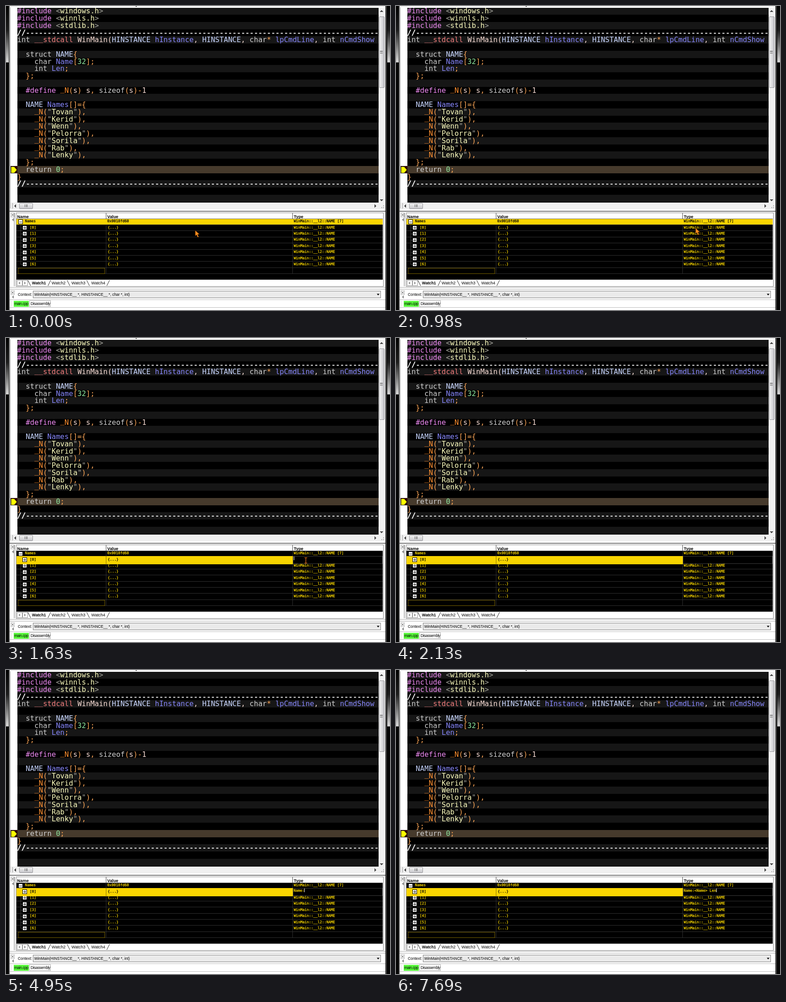
Animation, 842 px wide and 665 px high, one loop 8 s. Source, as an HTML page:

```html
<!DOCTYPE html>
<html lang="en">
<head>
<meta charset="utf-8">
<title>Debugger watch</title>
<style>
  html, body { margin: 0; width: 100%; height: 100%; overflow: hidden; background: #000; }
  svg { display: block; width: 842px; height: 665px; }
  text { white-space: pre; }
  .code { font: 15.68px "DejaVu Sans Mono", monospace; fill: #d4d4d4; }
  .cell { font: 7.92px "DejaVu Sans Mono", monospace; color: #ffdc00; }
  .cell, .cell text { fill: currentColor; stroke: currentColor; stroke-width: .25px; }
  .ui { font: 8.5px "Liberation Sans", Arial, sans-serif; fill: #000; }
  .ui.b { font-weight: bold; font-size: 9.3px; }
  .tab { font-size: 9.1px; }
  .tight { font-size: 8.4px; letter-spacing: -.42px; }
  .pp { fill: #f08cf4; }
  .st { fill: #ffffc0; }
  .q { fill: #a4a49c; }
  .kw { fill: #d0d0d0; }
  .cc { fill: #f07c7c; }
  .fn { fill: #f8dcd4; }
  .ty { fill: #c8d6ff; }
  .id { fill: #8686fa; }
  .op { fill: #ffa858; }
  .mc { fill: #ff9030; }
  .nu { fill: #90e8a0; }
  .cm { fill: #fff; stroke: #fff; stroke-width: .5px; }
  .px { shape-rendering: crispEdges; }
  .sel { color: #000; }
</style>
</head>
<body>
<svg viewBox="0 0 842 665">
  <defs>
    <linearGradient id="edge" x2="0" y2="1">
      <stop offset="0" stop-color="#000"/><stop offset=".08" stop-color="#1c1c1c"/>
      <stop offset=".184" stop-color="#d8d8d8"/><stop offset=".187" stop-color="#050505"/>
      <stop offset="1" stop-color="#050505"/>
    </linearGradient>
    <linearGradient id="thumbV"><stop offset="0" stop-color="#f6f6f6"/><stop offset="1" stop-color="#c4c4c8"/></linearGradient>
    <linearGradient id="thumbH" x2="0" y2="1"><stop offset="0" stop-color="#f6f6f6"/><stop offset="1" stop-color="#c4c4c8"/></linearGradient>
    <clipPath id="pane"><rect x="25" y="4" width="792" height="426"/></clipPath>
  </defs>

  <!-- window frame -->
  <g class="px">
    <rect width="842" height="665" fill="#000"/>
    <rect width="6" height="665" fill="url(#edge)"/>
    <rect x="836" width="6" height="665" fill="url(#edge)"/>
    <rect x="6" width="2" height="665" fill="#4c4c4c"/>
    <rect x="833" width="2" height="665" fill="#4c4c4c"/>
    <rect x="8" width="824" height="665" fill="#fff"/>
    <rect x="8" width="824" height="2" fill="#f0f0f0"/>
    <path d="M283 0h5l-2.500 2z" fill="#444"/>
    <rect x="9" y="3" width="1" height="440" fill="#999"/>
    <rect x="25" y="4" width="792" height="426" fill="#000"/>
  </g>
  <g id="stripes" class="px" clip-path="url(#pane)"></g>
  <rect x="25" y="350" width="792" height="16" fill="#463a2c" class="px"/>
  <rect x="10" y="350" width="15" height="16" fill="#300808" class="px"/>
  <path d="M11 351.500h7l6 7-6 7h-7z" fill="#ff0" stroke="#000" stroke-width=".8"/>
  <g id="code" class="code" clip-path="url(#pane)"></g>

  <!-- scroll bars -->
  <g class="px">
    <rect x="817" y="4" width="14" height="426" fill="#f0f0f0"/>
    <rect x="818.500" y="23.500" width="11" height="155" rx="2" fill="url(#thumbV)" stroke="#959599"/>
    <path d="M820 98h6M820 100.500h6M820 103h6" stroke="#666"/>
    <path d="M820 13h7l-3.500-4zM820 423h7l-3.500 4z" fill="#444"/>
    <rect x="10" y="430" width="821" height="15" fill="#f0f0f0"/>
    <rect x="29.500" y="431.500" width="29" height="12" rx="2" fill="url(#thumbH)" stroke="#959599"/>
    <path d="M41.500 434v6M44 434v6M46.500 434v6" stroke="#666"/>
    <path d="M22 434v7l-4-3.500zM808 434v7l4-3.500z" fill="#444"/>
    <path d="M14.500 431v12" stroke="#999"/>
    <path d="M827 436h2v2h-2zM827 440h2v2h-2zM823 440h2v2h-2z" fill="#aaa"/>
    <rect x="8" y="445" width="824" height="3" fill="#fff"/>
    <rect x="8" y="448" width="824" height="2" fill="#777"/>
  </g>

  <!-- watch panel -->
  <g class="px">
    <rect x="22" y="452" width="805" height="161" fill="#fff" stroke="#888"/>
    <rect x="23" y="466" width="803" height="133" fill="#000"/>
    <path d="M22 465.500h804" stroke="#777"/>
    <path d="M219.500 453v13M628.500 453v13" stroke="#444"/>
    <path d="M17.500 453v160M19.500 453v160M8 615.500h824M8 619.500h824" stroke="#aaa"/>
  </g>
  <path d="M12 454.500l5 5m0-5l-5 5M12 624.500l5 5m0-5l-5 5" stroke="#444"/>
  <rect x="10.500" y="452.500" width="8" height="9" fill="none" stroke="#bbb"/>
  <rect x="10.500" y="622.500" width="8" height="9" fill="none" stroke="#bbb"/>
  <path d="M17 464v7l-4-3.500zM17 633v7l-4-3.500z" fill="#888"/>
  <g class="ui b">
    <text x="24.500" y="463.500">Name</text><text x="222" y="463.500">Value</text><text x="631" y="463.500">Type</text>
  </g>
  <g id="grid" class="px" stroke="#303030"></g>
  <rect id="hl" class="px" x="23" width="803" fill="#f8d400"/>
  <g id="tree" class="px"></g>
  <g id="cells" class="cell"></g>
  <rect class="px" x="26.500" y="573.500" width="190" height="12" fill="none" stroke="#7a6400"/>

  <g id="edit">
    <rect class="px" x="23" y="477" width="606" height="18" fill="#f8d400"/>
    <rect class="px" x="629.500" y="477.500" width="196" height="16" fill="#000" stroke="#3c3c3c"/>
    <path class="px" d="M219.500 477v18" stroke="#8a7400"/>
    <g id="editBox" class="px"></g>
    <g id="editRow" class="cell"></g>
    <text id="typed" class="cell" x="630.500" y="485.300"></text>
    <rect id="caret" class="px" y="478" width="1" height="8" fill="#fff"/>
  </g>

  <!-- tabs -->
  <path class="px" d="M23 598.500h803" stroke="#555"/>
  <g fill="none" stroke="#999" class="px"><rect x="24.500" y="600.500" width="11" height="11"/><rect x="36.500" y="600.500" width="11" height="11"/></g>
  <path d="M31 603v6l-3.500-3zM40 603v6l3.500-3z" fill="#888"/>
  <path d="M48 600l6 12M92 612l6-12M134 600l6 12M177 600l6 12M221 612l6-12" fill="none" stroke="#222"/>
  <g class="ui">
    <text x="57" y="609" font-weight="bold" style="font-size:8.7px">Watch1</text>
    <text class="tab" x="100" y="609">Watch2</text>
    <text class="tab" x="143.500" y="609">Watch3</text>
    <text class="tab" x="187" y="609">Watch4</text>
    <text x="26" y="634" style="font-size:8.350px">Context:</text>
  </g>

  <!-- context bar and file tabs -->
  <rect class="px" x="59.500" y="623.500" width="762" height="15" fill="#eaeaea" stroke="#808080"/>
  <path d="M813 629.500h6l-3 3.500z"/>
  <text class="ui" x="62" y="634" style="font-size:8.440px">WinMain(HINSTANCE__ *, HINSTANCE__ *, char *, int)</text>
  <g class="px">
    <path d="M8 642.500h824M8 659.500h824" stroke="#bbb"/>
    <path d="M11.500 646v11" stroke="#aaa" stroke-dasharray="1 2"/>
    <rect x="17" y="645" width="33" height="13" fill="#58f83c"/>
    <rect x="51.500" y="644.500" width="46" height="13" fill="#fff" stroke="#aaa"/>
  </g>
  <text class="ui tight" x="18" y="654">main.cpp</text>
  <text class="ui tight" x="54" y="654">Disassembly</text>

  <!-- pointers -->
  <path id="arrow" d="M0 0v12l2.800-2.400 2.500 5.400 2.300-1-2.500-5.200 3.900-.5z" fill="#ff9020" stroke="#5a2800" stroke-width=".7"/>
  <g id="noDrop" fill="none" transform="translate(658 486)">
    <circle r="6" stroke="#fff" stroke-width="4"/><path d="M-4-4l8 8" stroke="#fff" stroke-width="3.500"/>
    <circle r="6" stroke="#000" stroke-width="2"/><path d="M-4-4l8 8" stroke="#000" stroke-width="2"/>
  </g>
  <path id="beam" d="M654.500 480.500h2l1 1 1-1h2M657.500 481v11M654.500 492.500h2l1-1 1 1h2" fill="none" stroke="#f07820" stroke-width="1.200"/>
</svg>
<script>
const $ = id => document.getElementById(id);
const esc = s => s.replace(/&/g, "&amp;").replace(/</g, "&lt;");
const show = (id, on) => $(id).style.display = on ? "" : "none";

// Each line is a run of "class~text" pieces divided by "|".
const include = f => `pp~#include |q~<|st~${f}|q~>`;
const rule = "cm~//" + "-".repeat(82);
const entry = s => `mc~    _N|op~(|q~"|st~${s}|q~"|op~),`;
const lines = [
  include("windows.h"), include("winnls.h"), include("stdlib.h"), rule,
  "kw~int |cc~__stdcall |fn~WinMain(|ty~HINSTANCE |id~hInstance|fn~, |ty~HINSTANCE|fn~, |kw~char|op~* |id~lpCmdLine|fn~, |kw~int |id~nCmdShow",
  "", "kw~  struct |ty~NAME|op~{", "kw~    char |id~Name|op~[|nu~32|op~];", "kw~    int |id~Len|op~;", "op~  };",
  "", "pp~  #define |mc~_N|op~(|fn~s|op~) |fn~s|op~, |kw~sizeof|op~(|fn~s|op~)-|fn~1",
  "", "ty~  NAME |id~Names|op~[]={",
  ...["Tovan", "Kerid", "Wenn", "Pelorra", "Sorila", "Rab", "Lenky"].map(entry),
  "op~  };", "kw~  return |nu~0|op~;", "op~}", rule
];
const pitch = 15.75;
// Underscores sit just under the baseline
const raise = s => s.replace(/(_+)(\w)/, '<tspan dy="-2.5" stroke-width=".5">$1</tspan><tspan dy="2.5">$2</tspan>');
$("code").innerHTML = lines.map((l, i) =>
  `<text x="24.5" y="${16.4 + i * pitch}">` + l.split("|").map(p => {
    const [c, s] = p.split("~");
    return s ? `<tspan class="${c}">${raise(esc(s))}</tspan>` : "";
  }).join("") + "</text>").join("");

let html = "";
for (let i = 0; i < 27; i += 2)
  html += `<rect x="25" y="${Math.round(3 + i * pitch)}" width="792" height="16" fill="#161616"/>`;
$("stripes").innerHTML = html;

// Watch rows
const rowY = i => 473.2 + i * 13.4;
const cell = (x, y, s) => `<text x="${x}" y="${y}">${s}</text>`;
const box = (x, y, plus) =>
  `<rect x="${x - 4.5}" y="${y - 4.5}" width="9" height="9" fill="#fff" stroke="#000"/>` +
  `<path d="M${x - 3} ${y + .5}h6${plus ? `M${x + .5} ${y - 3}v6` : ""}" stroke="#000"/>`;
const type = "WinMain::__l2::NAME";
const rowCells = i => cell(52, rowY(i + 1), `[${i}]`) + cell(223, rowY(i + 1), "{...}");

let grid = '<path d="M219.500 466v120M628.500 466v120"/>';
let tree = '<path d="M32.500 476v89" stroke="#777" stroke-dasharray="1 1"/>';
let cells = `<g id="r0">${cell(41.5, 473.2, "Names")}${cell(222, 473.2, "0x0018fd60")}${cell(631, 473.2, type + " [7]")}</g>`;
for (let i = 0; i < 7; i++) {
  const y = Math.round(485 + i * 13.4);
  tree += `<path d="M33 ${y + .5}h5" stroke="#777" stroke-dasharray="1 1"/>` + box(41, y, true);
  cells += `<g id="r${i + 1}">${rowCells(i)}${cell(631, rowY(i + 1), type)}</g>`;
}
for (let i = 0; i < 9; i++) grid += `<path d="M23 ${Math.round(478 + i * 13.4) + .5}h803"/>`;
$("grid").innerHTML = grid;
$("tree").innerHTML = tree + box(32, 472, false);
$("cells").innerHTML = cells;
$("editRow").innerHTML = `<g class="sel">${rowCells(0)}</g>`;
$("editBox").innerHTML = box(41, 485, true);

// Typing: time of each key, then the spans in which the caret is dark
const text = "Name:<Name> Len";
const keys = [3720, 3850, 3980, 4100, 4950, 5210, 5470, 5600, 5730, 5860, 6780, 7110, 7440, 7630, 7690];
const dark = [[2130, 2660], [3190, 3720], [4620, 4950], [6390, 6780]];

function pointer(t) {
  if (t < 1890) {
    const k = Math.min(9, Math.max(0, Math.floor((t - 500) / 60) + 1)) / 9;
    const p = k * k * (3 - 2 * k);
    return [415 + 242 * p, 490.5 - 4.5 * p + 11 * Math.sin(Math.PI * p)];
  }
  const k = (Math.floor((t - 1890) / 60) + 1) / 4;
  return [657 + 7 * k, 486 + 121 * k * k];
}

function draw(t) {
  const edit = t >= 1630, first = t < 1240;
  $("hl").setAttribute("y", first ? 466 : 478);
  $("hl").setAttribute("height", first ? 12 : 14);
  $("r0").classList.toggle("sel", first);
  $("r1").classList.toggle("sel", !first);
  show("edit", edit);

  const n = keys.filter(k => t >= k).length;
  $("typed").textContent = text.slice(0, n);
  $("caret").setAttribute("x", Math.floor(631 + n * 4.77));
  show("caret", !dark.some(([a, b]) => t >= a && t < b));

  const noDrop = t >= 1240 && t < 1300, beam = edit && t < 1890;
  show("noDrop", noDrop);
  show("beam", beam);
  show("arrow", !noDrop && !beam && t < 2130);
  $("arrow").setAttribute("transform", `translate(${pointer(t).map(Math.round)})`);
}

const start = performance.now();
function tick(now) {
  draw(Math.max(0, now - start) % 8000);
  requestAnimationFrame(tick);
}
draw(0);
requestAnimationFrame(tick);
</script>
</body>
</html>
```
